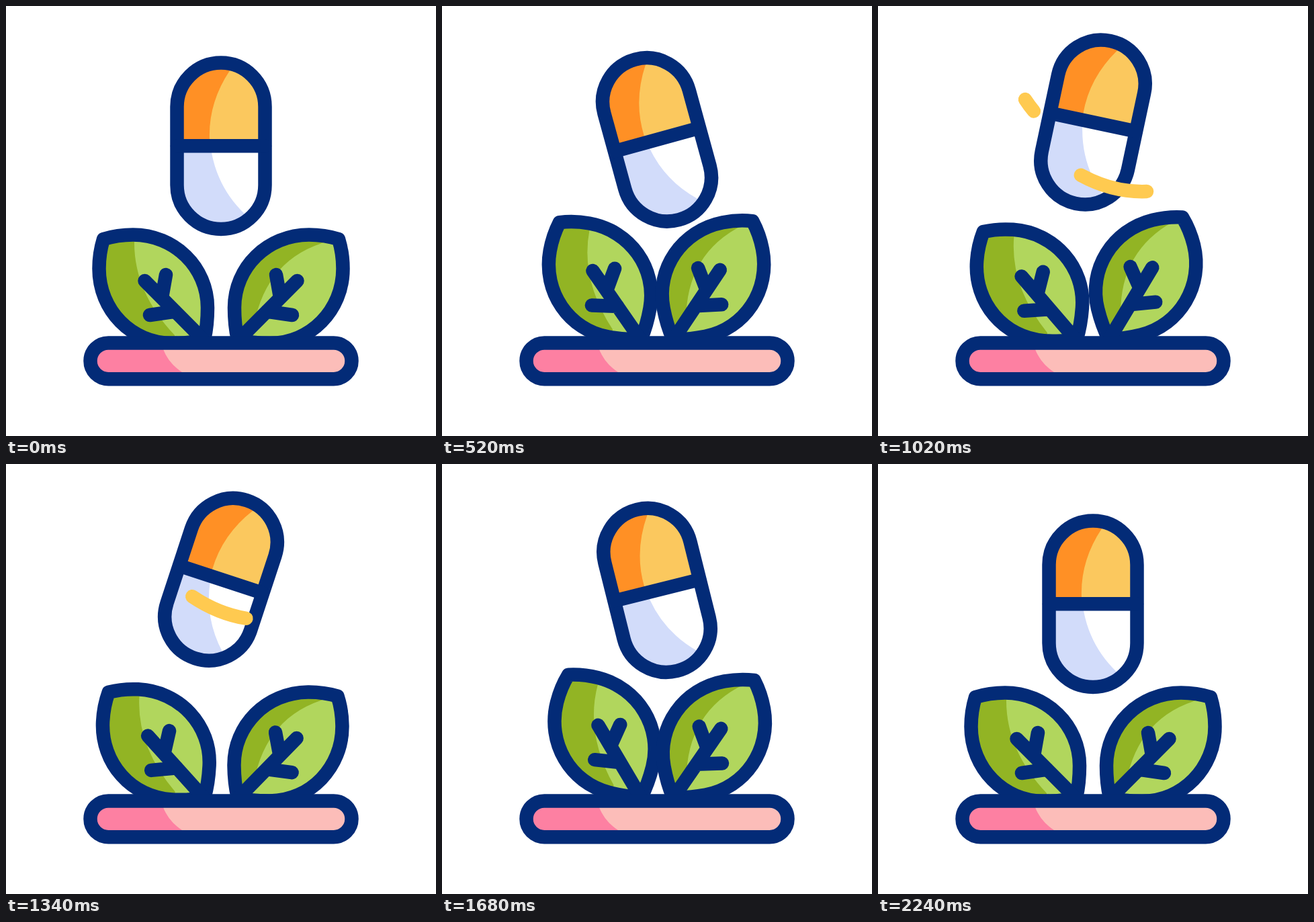
Animation of 640 by 640 pixels, one loop 2400 ms. Source, as an HTML page:

```html
<!DOCTYPE html>
<html lang="en">
<head>
<meta charset="utf-8">
<title>Herbal capsule</title>
<style>
  html, body { margin: 0; width: 100%; height: 100%; overflow: hidden; background: #fff; }
  svg { display: block; width: 100%; height: 100%; }
  .line { fill: none; stroke: #032b77; stroke-width: 20.5; stroke-linecap: round; stroke-linejoin: round; }
  .swirl { fill: none; stroke: #ffca50; stroke-width: 20.5; stroke-linecap: round; }
</style>
</head>
<body>
<svg viewBox="0 0 640 640">
  <defs>
    <path id="leaf" d="M145 347Q166 340.5 189 340.5C251 340.5 300 389 300 449Q300 475 295 497
      Q273 502 247 502C187 502 138.5 453 138.5 391Q138.5 368 145 347Z"/>
    <path id="veins" d="M206.5 409L292 495M238 400L232 434M214 460L252 454.500"/>
    <rect id="capsule" x="-65.5" y="-123.7" width="131" height="247.4" rx="65.5"/>
    <rect id="dish" x="125.500" y="501.5" width="389" height="53.700" rx="26.85"/>
    <clipPath id="leafClip"><use href="#leaf"/></clipPath>
    <clipPath id="capsuleClip"><use href="#capsule"/></clipPath>
    <clipPath id="dishClip"><use href="#dish"/></clipPath>
  </defs>

  <g id="leftLeaf">
    <g clip-path="url(#leafClip)">
      <use href="#leaf" fill="#b1d65d"/>
      <path fill="#92b424" d="M120 330H191V350Q190 425 251 490V510H120Z"/>
    </g>
    <use href="#leaf" class="line"/>
    <use href="#veins" class="line"/>
  </g>

  <g id="rightLeaf">
    <g transform="matrix(-1 0 0 1 640 0)">
      <g clip-path="url(#leafClip)">
        <use href="#leaf" fill="#b1d65d"/>
        <path fill="#92b424" d="M140 330L160 350Q252 375 271 475L278 510H320V330Z"/>
      </g>
      <use href="#leaf" class="line"/>
      <use href="#veins" class="line"/>
    </g>
  </g>

  <g clip-path="url(#dishClip)">
    <use href="#dish" fill="#fcbdb9"/>
    <path fill="#fd80a2" d="M110 495H230L234 511Q242 532 262 545L280 560H110Z"/>
  </g>
  <use href="#dish" class="line"/>

  <g id="pill">
    <g clip-path="url(#capsuleClip)">
      <use href="#capsule" fill="#fff"/>
      <path fill="#fbc85e" d="M-70-130H70V0H-70Z"/>
      <path fill="#ff9025" d="M-70-130H25L13-112Q-19-64-17-10V0H-70Z"/>
      <path fill="#d2dcfa" d="M-70 0H-16L-14 10Q-4 64 36 102L50 130H-70Z"/>
    </g>
    <use href="#capsule" class="line"/>
    <path class="line" d="M-65 0H65"/>
  </g>

  <path id="lowSwirl" class="swirl" pathLength="1" transform="translate(7 44)" d="M219 139C250 187 317 235 393 232"/>
  <path id="highSwirl" class="swirl" pathLength="1" d="M219 139C250 187 317 235 393 232"/>
</svg>
<script>
const LOOP = 2400;
const el = id => document.getElementById(id);
const pill = el("pill"), leftLeaf = el("leftLeaf"), rightLeaf = el("rightLeaf");
const lowSwirl = el("lowSwirl"), highSwirl = el("highSwirl");

// Each track is a list of [time, value] keys.
const lift = [[200, 0], [1200, -38.5], [2200, 0]];
const tilt = [[200, 0], [700, -21.7], [1200, 26], [1700, -14.2], [2200, 0]];
const leftSway = [[200, 0], [700, 14.3], [1200, 0], [1700, 14.3], [2200, 0]];
const rightSway = [[200, 0], [800, -20], [1400, 0], [1800, -13], [2200, 0]];

function ease(t, from, to) {
  const p = Math.min(1, Math.max(0, (t - from) / (to - from)));
  return p * p * (3 - 2 * p);
}

function valueAt(keys, t) {
  return keys.slice(1).reduce((v, [time, next], i) => {
    const [start, prev] = keys[i];
    return v + (next - prev) * ease(t, start, time);
  }, keys[0][1]);
}

function trim(path, start, end) {
  const visible = end - start > 0.002;
  path.style.display = visible ? "" : "none";
  if (!visible) return;
  path.setAttribute("stroke-dasharray", `${end - start} 3`);
  path.setAttribute("stroke-dashoffset", -start);
}

function draw(t) {
  pill.setAttribute("transform", `translate(320 ${208.2 + valueAt(lift, t)}) rotate(${valueAt(tilt, t)})`);
  leftLeaf.setAttribute("transform", `rotate(${valueAt(leftSway, t)} 300 503)`);
  rightLeaf.setAttribute("transform", `rotate(${valueAt(rightSway, t)} 340 503)`);
  trim(lowSwirl, ease(t, 760, 1280), ease(t, 540, 1020));
  trim(highSwirl, ease(t, 1080, 1680), ease(t, 900, 1500));
}

const begin = performance.now();
function tick() {
  draw((performance.now() - begin) % LOOP);
  requestAnimationFrame(tick);
}
tick();
</script>
</body>
</html>
```
